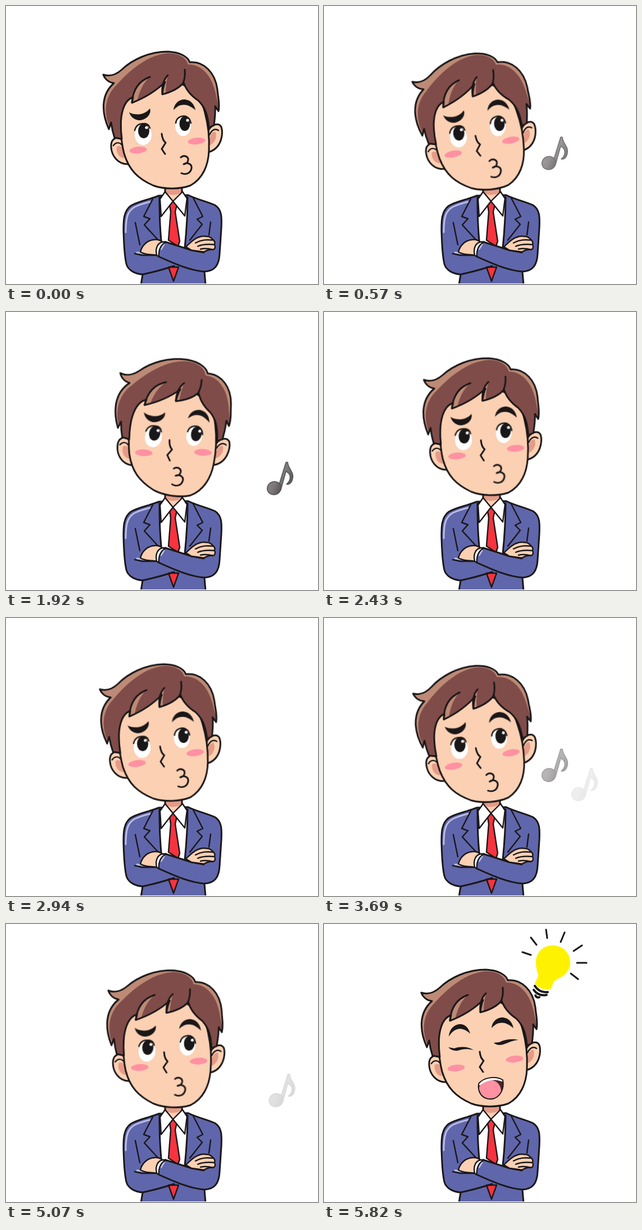
An HTML page without scripts for the animation above (8 s loop, 555x494 px).

```html
<!DOCTYPE html>
<html lang="en">
<head>
<meta charset="utf-8">
<title>Whistling idea</title>
<style>
  html, body { margin: 0; width: 100%; height: 100%; overflow: hidden; background: #fff; }
  svg { display: block; width: 100%; height: 100%; }

  .ink { stroke: #1a1718; stroke-width: 3; stroke-linecap: round; stroke-linejoin: round; }
  .line { fill: none; }
  .thin { stroke-width: 2.4; }
  .black { fill: #1a1718; }
  .white { fill: #fff; }
  .skin { fill: #fbd0b3; }
  .shade { fill: #e59b87; }
  .blush { fill: #ff91a2; }
  .suit { fill: #6066ab; }
  .tie { fill: #f7333f; }

  .move { animation: 8s linear infinite; }
  .sway { animation-name: sway; transform-origin: 297px 320px; }
  .shift { animation-name: shift; transform-origin: 280px 215px; }
  .pondering { animation-name: pondering; }
  .happy { animation-name: happy; }
  .bulb { animation-name: glow; }
  .near { animation-name: near; }
  .far { animation-name: far; }

  /* Two whistling cycles of 2725 ms, then the idea */
  @keyframes sway {
    0%, 34.06%, 68.12%, 100% { transform: rotate(0deg); }
    9.9%, 43.96% { transform: rotate(-6.6deg); }
    16.2%, 50.26% { transform: rotate(0deg); }
    21.4%, 24.4%, 55.46%, 58.46% { transform: rotate(8.4deg); }
    30.4%, 64.46% { transform: rotate(1.3deg); }
  }
  @keyframes shift {
    0%, 34.06%, 68.12%, 100% { transform: translate(0, 0) rotate(0deg); }
    10.4%, 26.9%, 44.4%, 60.9% { transform: translate(var(--x), var(--y)) rotate(var(--turn, 0deg)); }
  }
  @keyframes pondering {
    0%, 68.12% { opacity: 1; }
    68.13%, 100% { opacity: 0; }
  }
  @keyframes happy {
    0%, 68.12% { opacity: 0; }
    68.13%, 100% { opacity: 1; }
  }
  @keyframes glow {
    0%, 68.12% { opacity: 0; }
    72.75%, 100% { opacity: 1; }
  }
  @keyframes near {
    0%, 3.1% { transform: translateX(395px); opacity: 0; }
    8.75% { transform: translateX(402px); opacity: .9; }
    14.25% { transform: translateX(409px); opacity: .45; }
    18.5% { transform: translateX(413px); opacity: 0; }
    38.5% { transform: translateX(391px); opacity: 0; }
    46.1% { transform: translateX(400px); opacity: .45; }
    53% { transform: translateX(409px); opacity: 1; }
    56% { transform: translateX(412px); opacity: 1; }
    62%, 100% { transform: translateX(419px); opacity: 0; }
  }
  @keyframes far {
    0%, 8.75% { transform: translateX(452px); opacity: 0; }
    14.25% { transform: translateX(462px); opacity: .78; }
    18.1% { transform: translateX(468px); opacity: 1; }
    24% { transform: translateX(477px); opacity: .8; }
    26.6% { transform: translateX(481px); opacity: 0; }
    45% { transform: translateX(451px); opacity: 0; }
    46.1% { transform: translateX(453px); opacity: .1; }
    55.5% { transform: translateX(469px); opacity: 1; }
    61% { transform: translateX(478px); opacity: .9; }
    64%, 100% { transform: translateX(481px); opacity: 0; }
  }
</style>
</head>
<body>
<svg viewBox="0 0 555 494">
  <defs>
    <path id="hair" d="M173 122C185 126 196 122 206 113C225 95 255 81 288 81C308 82 323 89 327 100C352 98 372 118 376 148C377 162 381 174 378 187L372 178C373 192 371 202 370 212L361 216C359 190 352 178 342 168C330 160 320 148 316 136C308 146 294 153 278 157C279 148 280 141 283 135C270 148 250 162 224 172L226 162C211 167 200 190 206 236L193 234C190 225 188 215 187 207L183 219C170 190 168 158 192 137C183 136 176 130 173 122Z"/>
    <clipPath id="hairClip"><use href="#hair"/></clipPath>
    <path id="openMouth" d="M275 284C283 273 304 269 318 277C321 292 314 309 298 311C282 312 273 300 275 284Z"/>
    <clipPath id="mouthClip"><use href="#openMouth"/></clipPath>
    <path id="rightBrow" class="black" d="M298 185C299 173 308 166 318 166C328 167 335 174 337 185C328 177 319 174 312 176C306 177 302 181 298 185Z"/>
    <linearGradient id="noteFill" x1="0" y1="0" x2="1" y2="1">
      <stop offset="0" stop-color="#6f696b"/>
      <stop offset=".45" stop-color="#5b5557"/>
      <stop offset="1" stop-color="#1f1b1d"/>
    </linearGradient>
    <g id="note" fill="url(#noteFill)" stroke="#2b2729" stroke-width="1.6" stroke-linejoin="round">
      <path d="M8-4L21-46L24-46C25-34 35-30 33-18C32-10 27-6 22-7C29-13 30-21 26-26L21-30L12 2Z"/>
      <ellipse rx="12.5" ry="11.5" transform="rotate(-25)"/>
    </g>
  </defs>

  <g class="body ink">
    <path class="suit" d="M272 337C255 344 235 347 222 355C208 365 209 385 209 400C210 425 210 440 214 458C217 470 230 476 243 477L240 496H355L353 472C372 471 379 460 380 440L383 395C384 375 384 362 372 354C360 348 340 344 324 336Z"/>
    <path class="line" d="M213 402C213 374 217 364 229 357C238 353 248 350 256 348" stroke="#b9bde4"/>
    <path class="white" d="M273 340C273 375 274 400 277 425L318 430C321 400 323 370 323 340Z"/>
    <path class="tie thin" d="M291 353L297 346L304 353L301 366L309 418L306 427L289 416L293 366Z"/>
    <path class="skin" d="M283 320V332L297 347L314 332V320Z" stroke="none"/>
    <path class="shade" d="M283 320V332C292 337 304 337 313 331V320Z" stroke="none"/>
    <path class="line" d="M283 322V332M313 322V332"/>
    <path class="white thin" d="M283 330L274 343L276 374L297 347ZM314 330L322 342L318 373L297 347Z"/>
    <path class="line thin" d="M261 343L245 374L256 378L246 389L269 414M333 341L350 374L340 379L349 388L327 416M230 385L238 424M364 384L361 407"/>
    <path class="tie thin" d="M289 464L298 489L307 464Z"/>
    <path class="suit" d="M283 419L330 434L352 438L353 472C327 470 300 458 271 445Z" stroke="none"/>
    <path class="line" d="M352 438L330 434L283 419M271 445C300 458 327 470 353 472M243 477C262 473 280 468 299 462"/>
    <path class="line" d="M233 438L243 439M276 432L281 424" stroke="#b9bde4"/>
    <path class="skin thin" d="M239 437C242 425 252 415 266 415C272 415 276 417 279 420L268 443C258 440 252 444 239 437Z"/>
    <path class="line thin" d="M229 440L242 443L268 443"/>
    <path class="white thin" d="M280 419C270 420 265 430 268 443L272 445C271 434 275 424 284 420Z"/>
    <path class="skin thin" d="M320 428C330 418 340 409 352 409C363 409 365 412 368 415C372 418 372 421 371 424C373 428 372 432 368 433C362 432 358 434 352 437L330 434Z"/>
    <path class="line thin" d="M337 421C348 415 357 415 368 416M341 427C350 423 360 423 371 424M346 432C354 430 361 431 368 433"/>
    <path class="white" stroke="none" d="M230 493H365V494H230Z"/>
  </g>

  <g class="move shift" style="--x:0px;--y:2.5px">
    <g class="move sway">
      <g class="ink">
        <path class="skin" d="M207 238C195 230 186 237 187 251C188 266 199 282 218 281Z"/>
        <path class="skin" d="M360 221C367 209 379 207 383 215C387 226 384 254 359 260Z"/>
        <path class="shade" stroke="none" d="M197 250C205 246 211 252 214 270C204 272 195 263 197 250ZM361 248C360 234 365 224 372 223C377 232 371 245 361 248Z"/>
        <path class="line thin" d="M191 248C196 241 203 242 207 248M362 229C366 220 372 217 378 221"/>
        <path class="skin" d="M207 170C202 195 203 235 210 262C219 292 235 307 262 319C281 326 309 326 328 319C350 307 360 283 361 257C362 235 360 212 354 190C345 150 310 130 270 130Z"/>
      </g>
      <use href="#hair" fill="#bd8a75"/>
      <g clip-path="url(#hairClip)">
        <path fill="#7f4c49" d="M184 215C172 185 178 158 197 140C222 112 255 85 290 84C312 85 321 94 324 104C348 103 368 125 374 160L390 230L180 240Z"/>
        <path fill="#bd8a75" d="M224 172C226 150 236 132 256 126C243 137 237 153 233 170ZM278 157C276 143 280 130 288 123C285 135 284 148 284 156Z"/>
      </g>
      <use href="#hair" class="ink line"/>
      <path class="ink line" d="M224 171C226 150 236 133 256 126M278 156C277 143 280 131 288 123M318 113C319 124 318 130 315 137"/>
      <g class="blush">
        <ellipse cx="235" cy="256" rx="15.5" ry="6" transform="rotate(-6 235 256)"/>
        <ellipse cx="339" cy="240" rx="15.5" ry="6" transform="rotate(-6 339 240)"/>
      </g>
      <path class="ink line" d="M277 227C278 236 280 240 284 243L277 254L283 263"/>

      <g class="move pondering">
        <g class="move shift" style="--x:4.5px;--y:-1.5px;--turn:2.5deg">
          <ellipse class="white" cx="244" cy="229" rx="15" ry="18"/>
          <ellipse class="white" cx="315" cy="213" rx="14" ry="18"/>
          <ellipse class="black" cx="245" cy="222" rx="10" ry="13"/>
          <ellipse class="black" cx="318" cy="209" rx="9.5" ry="13"/>
          <circle class="white" cx="250" cy="216" r="2.6"/>
          <circle class="white" cx="323" cy="203" r="2.6"/>
          <path class="ink line thin" d="M229 221C231 212 238 208 248 209C252 210 255 213 256 217M302 208C303 199 311 194 320 196C325 198 328 202 329 208"/>
          <path class="black" d="M219 189C230 195 247 194 256 182C260 193 247 204 236 203C228 202 222 197 219 189Z"/>
          <use href="#rightBrow"/>
        </g>
        <path class="ink line move shift" style="--x:-19px;--y:7px" d="M311 269C316 264 325 267 324 274C323 279 319 281 316 281C323 277 331 281 330 288C329 296 321 301 312 297"/>
      </g>

      <g class="move happy">
        <path class="black" d="M222 200C223 186 233 177 244 178C252 179 258 186 260 195C252 187 243 185 237 187C230 189 226 194 222 200Z"/>
        <use href="#rightBrow"/>
        <path class="black" d="M221 219L232 221C244 217 256 218 266 224C254 221 246 222 238 225C232 226 226 224 221 219ZM302 211L312 210C324 204 336 204 346 206C334 207 328 211 319 214C312 216 306 215 302 211Z"/>
        <use href="#openMouth" fill="#4a2626"/>
        <g clip-path="url(#mouthClip)">
          <ellipse class="blush" cx="295" cy="297" rx="20" ry="20"/>
          <path class="white" d="M274 284C283 272 304 268 320 276L319 281C304 274 290 277 277 287Z"/>
        </g>
        <use href="#openMouth" class="ink line" style="stroke-width:2"/>
      </g>
    </g>
  </g>

  <g transform="translate(0 279)"><use href="#note" class="move near"/></g>
  <g transform="translate(0 313)"><use href="#note" class="move far"/></g>

  <g class="move bulb">
    <path fill="#fff200" d="M407 38C425 38 438 52 438 68C438 84 427 93 413 99C407 103 407 109 404 115C392 118 380 114 375 106C377 100 381 96 381 90C378 82 377 76 377 68C377 50 390 38 407 38Z"/>
    <path class="ink line" style="stroke-width:4" d="M375 110C380 118 388 122 398 121M373 117C378 124 386 128 396 126M376 127C378 131 381 131 383 130"/>
    <path class="ink line" d="M395 10L397 25M428 15L421 32M459 38L444 48M450 69H467M439 88L452 98M368 55L353 50M378 37L368 24"/>
  </g>
</svg>
</body>
</html>
```
